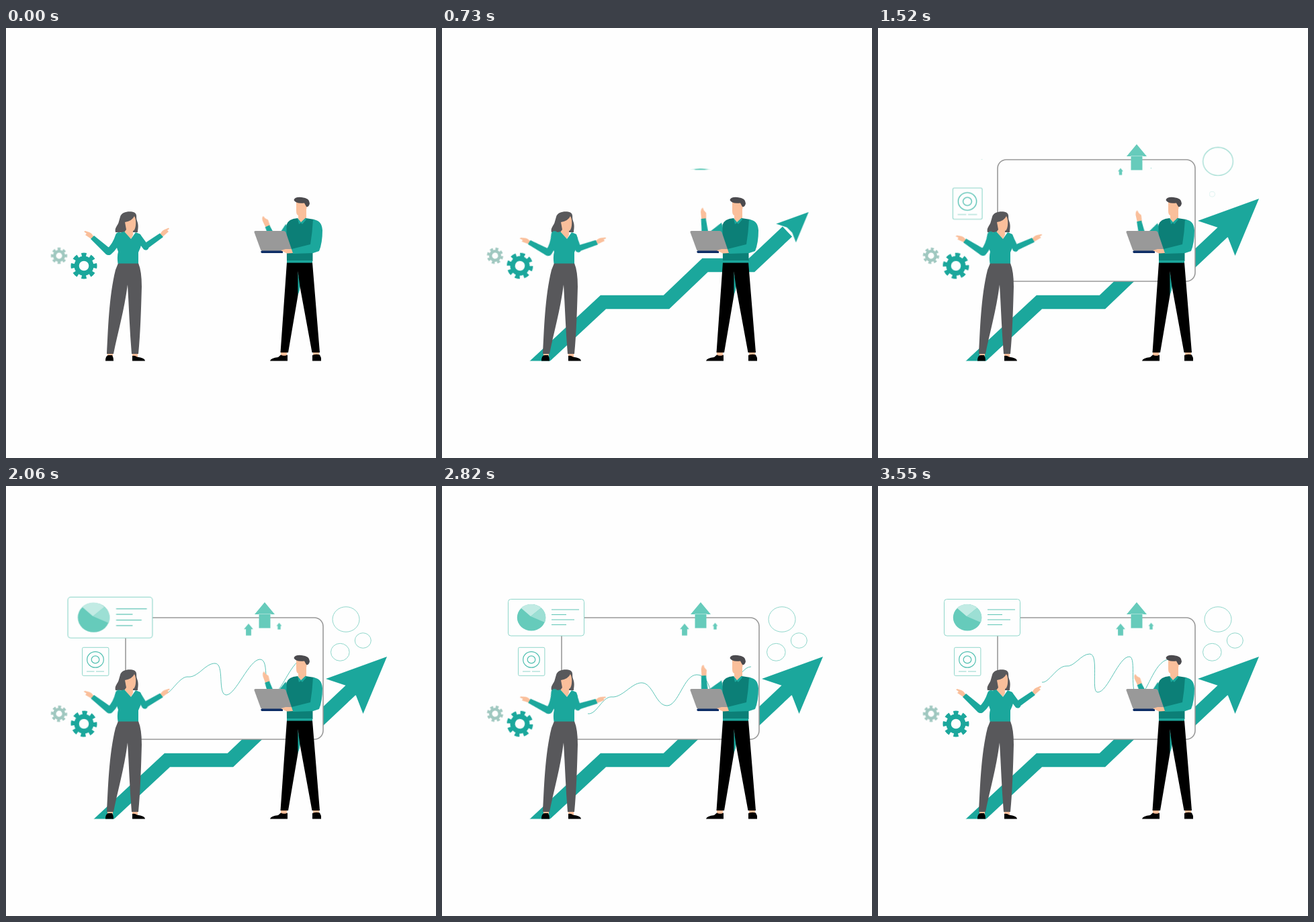
Write an HTML page without scripts that moves like this. It is 640 px wide and 640 px high and loops after 3610 ms.

```html
<!DOCTYPE html>
<html lang="en">
<head>
<meta charset="utf-8">
<title>Growth team</title>
<style>
html, body { margin: 0; width: 100%; height: 100%; overflow: hidden; background: #fefefe; }
svg { display: block; width: 100vw; height: 100vh; }

.teal { fill: #1ba79c; }
.skin { fill: #fabf9b; }
.grey { fill: #58585b; }
.sleeve { fill: none; stroke: #1ba79c; stroke-linejoin: round; stroke-linecap: round; }
.thin { fill: none; stroke: #8fd6ca; stroke-width: 1; }

.sway, .pop, .grow, .body, .wave { animation: 3.61s linear infinite; }
.sway { animation-name: sway; }
.pop { transform-box: fill-box; transform-origin: center; }
.grow { transform-box: fill-box; transform-origin: bottom; animation-name: grow; }
.body { fill: none; stroke: #1ba79c; stroke-width: 20.6; stroke-dasharray: 1 2; animation-name: body; }
.wave { fill: none; stroke: #55c1b4; stroke-width: .95; stroke-dasharray: 1 2; animation-name: draw, wave; }

@keyframes sway {
  0%, 50.5%, 98.3%, to { transform: rotate(0deg); }
  10% { transform: rotate(calc(var(--turn) * .33)); }
  20.2% { transform: rotate(calc(var(--turn) * .75)); }
  29%, 33.5% { transform: rotate(var(--turn)); }
  42.1% { transform: rotate(calc(var(--turn) * .5)); }
  57.1% { transform: rotate(calc(var(--turn) * .22)); }
  74% { transform: rotate(var(--turn)); }
  78.1% { transform: rotate(calc(var(--turn) * .85)); }
}
@keyframes body {
  0% { stroke-dashoffset: 1; }
  14.4%, to { stroke-dashoffset: 0; }
}
@keyframes head {
  0%, 13.3% { transform: scale(0); }
  20.2% { transform: scale(.527); }
  30% { transform: scale(1.32); }
  33.5% { transform: scale(1.145); }
  37%, to { transform: scale(1); }
}
@keyframes grow {
  0%, 19.6% { transform: scaleY(0); }
  20.2% { transform: scaleY(.06); }
  30.2% { transform: scaleY(.78); }
  33.7% { transform: scaleY(1.23); }
  38%, to { transform: scaleY(1); }
}
@keyframes board {
  0%, 30% { transform: scale(0); }
  33.5% { transform: scale(.534); }
  37.5%, to { transform: scale(1); }
}
@keyframes note {
  0%, 30% { transform: scale(0); }
  33.5% { transform: scale(.48); }
  38.5% { transform: scale(1.25); }
  42.1% { transform: scale(1.11); }
  44.5%, to { transform: scale(1); }
}
@keyframes ringA {
  0%, 33.8% { transform: scale(0); }
  39.5% { transform: scale(1.25); }
  42.1% { transform: scale(1.12); }
  44.5%, to { transform: scale(1); }
}
@keyframes ringB {
  0%, 39.5% { transform: scale(0); }
  42.1% { transform: scale(.29); }
  49% { transform: scale(1.25); }
  52%, to { transform: scale(1); }
}
@keyframes ringC {
  0%, 43% { transform: scale(0); }
  51% { transform: scale(1.25); }
  55%, to { transform: scale(1); }
}
@keyframes upA {
  0%, 33% { transform: scale(0); }
  42.1% { transform: scale(.57); }
  47.5% { transform: scale(1.2); }
  50.5%, to { transform: scale(1); }
}
@keyframes upB {
  0%, 41.3% { transform: scale(0); }
  42.1% { transform: scale(.15); }
  50% { transform: scale(1.25); }
  53%, to { transform: scale(1); }
}
@keyframes card {
  0%, 41.6% { transform: scale(0); }
  42.1% { transform: scale(.02); }
  57.1% { transform: scale(1.115); }
  59.5% { transform: scale(1.3); }
  61.2% { transform: scale(1.24); }
  65%, to { transform: scale(1); }
}
@keyframes draw {
  0%, 45.5% { stroke-dashoffset: 1; visibility: hidden; }
  45.6% { visibility: visible; }
  56.5%, to { stroke-dashoffset: 0; visibility: visible; }
}
@keyframes wave {
  0%, 57.1% { d: path("M238 309C246 308 258 284 270 284C286 286 296 264 311 264C326 264 314 311 328 311C342 311 362 258 378 258C394 258 380 310 396 310C408 310 420 272 436 260"); }
  75%, 78.1% { d: path("M217 339C230 341 238 314 252 314C268 316 282 293 297 293C314 293 318 327 335 327C352 327 360 281 379 281C402 281 396 318 412 318C432 318 440 270 460 269"); }
  98.3%, to { d: path("M244 292C254 294 266 268 280 268C292 270 302 250 315 250C330 250 316 307 327 307C342 307 358 254 374 254C386 254 372 312 388 312C400 312 410 262 432 258"); }
}
</style>
</head>
<body>
<svg viewBox="0 0 640 640">
  <defs>
    <g id="gear" fill="none">
      <circle r="10.9" stroke-width="7.2"/>
      <circle r="16.5" stroke-width="6" pathLength="16" stroke-dasharray="1.1 .9" stroke-dashoffset=".55"/>
    </g>
    <path id="up" d="M0-19 15-1H8.5V19.5H-8.5V-1H-15Z" fill="#66cbbb"/>
    <clipPath id="ground"><path d="M0 0H640V495.5H0Z"/></clipPath>
  </defs>

  <!-- growth arrow -->
  <g clip-path="url(#ground)">
    <path class="body" pathLength="1" d="M125 515 240 408H334L391.5 353H461L514 303"/>
  </g>
  <path class="teal pop" style="animation-name:head" d="M567 254 531.5 339 521 312 506 297 476 287Z"/>

  <!-- board and its extras -->
  <rect class="pop" style="animation-name:board" x="178" y="196" width="294" height="181" rx="13" fill="#fefefe" stroke="#999" stroke-width="1.6"/>
  <path class="wave" pathLength="1"/>

  <g class="grow">
    <use href="#up" x="385" y="192"/>
    <path d="M376 190.5H395" stroke="#b5e5dd" stroke-width=".8"/>
  </g>
  <g class="pop" style="animation-name:upA"><use href="#up" transform="translate(361 213.5) scale(.46)"/></g>
  <g class="pop" style="animation-name:upB"><use href="#up" transform="translate(406.5 208.5) scale(.26)"/></g>

  <ellipse class="thin pop" style="animation-name:ringA" cx="506" cy="198.5" rx="20" ry="18.7"/>
  <ellipse class="thin pop" style="animation-name:ringB" cx="497.3" cy="247.3" rx="13.8" ry="13"/>
  <ellipse class="thin pop" style="animation-name:ringC" cx="531.3" cy="230" rx="12" ry="11.3"/>

  <g class="thin pop" style="animation-name:note">
    <rect x="113.5" y="240.3" width="39.4" height="42" rx="2" fill="#fefefe"/>
    <g stroke="#4fbfb0" stroke-width="1.2">
      <ellipse cx="133" cy="258.4" rx="12.3" ry="11.8"/>
      <ellipse cx="133" cy="258.4" rx="5.8" ry="5.5"/>
    </g>
    <path d="M120 276H131.5M134 276H146"/>
  </g>

  <g class="pop" style="animation-name:card">
    <rect class="thin" x="98.5" y="168.5" width="113" height="54.5" rx="4" style="fill:#fefefe"/>
    <ellipse cx="133" cy="195.7" rx="21.2" ry="19.7" fill="#66cbbb"/>
    <path d="M132 194 117.5 181.5A21.2 19.7 0 0 1 147.5 181.5Z" fill="#c2ebe4"/>
    <path d="M132 194 147.5 181.5A21.2 19.7 0 0 1 153 203Z" fill="#9cdfd4"/>
    <path d="M163 184H204M163 191.5H185M163 199H197M163 206.5H185" stroke="#5ec5b5" stroke-width="1.2"/>
  </g>

  <!-- gears -->
  <g transform="translate(79 339) scale(.62)" stroke="#a0c8c0"><use class="sway" style="--turn:20deg" href="#gear"/></g>
  <g transform="translate(116 354)" stroke="#1ba79c"><use class="sway" style="--turn:17deg" href="#gear"/></g>

  <!-- woman -->
  <path class="skin" d="M151 483H159V489H151ZM188 483H196V490H188Z"/>
  <path d="M148 495.5Q148 487 153 487H158Q160 490 160 495.5ZM188 495.5V488Q192 487 195 489.5Q207 491 207 495.5Z"/>
  <path class="grey" d="M167 350H197Q202 362 202 385C201 420 200 455 197 485H187C184 450 183 415 181 382C176 420 166 455 160 485H150C152 450 153 400 163 360Z"/>
  <path class="grey" d="M170 281C172 273 185 272 191 274.5C196 278 193 281 195 287C198 294 196 300 196 304H163C161 297 167 294 168 288Z"/>
  <path class="skin" d="M177 289Q188 287 191 280Q194 285 193 294Q192 301 189 302V308L186 314 176 304 179 300Z"/>
  <g class="sway" style="--turn:-18deg;transform-origin:160px 310px">
    <path class="sleeve" stroke-width="10" d="M168 309Q163 325 153 333"/>
    <path class="skin" d="M131 312Q128 305 124 304L118 302 116 303 120 306 118 308 127 314Z"/>
    <path class="teal" d="M157 330 131 309 126 314 149 337Q155 340 157 334Z"/>
  </g>
  <g class="sway" style="--turn:22deg;transform-origin:194px 310px">
    <path class="sleeve" stroke-width="9" d="M197 311 208 326"/>
    <path class="skin" d="M229 308Q232 301 236 300L242 297.5 243 299 240 301 242 303 234 310Z"/>
    <path class="teal" d="M204 322 229 305.5 234 311 213 326.5Q207 330 204 328Z"/>
  </g>
  <path class="teal" d="M176 303 186 314 193 304 200 307Q204 316 200 327L197 334V350.5H166.5Q165 340 167 333Q161 318 165 306Z"/>

  <!-- man -->
  <g class="sway" style="--turn:25deg;transform-origin:423px 290px">
    <g transform="rotate(-25 423 290)">
      <path class="skin" d="M387 282V275L387 270Q388 264 391 264L392 268 395 272 394 282Z"/>
      <path class="teal" d="M386.5 280H393.5L395 302 416 289 420 308 394 320Q385 320 384.5 310Z"/>
    </g>
  </g>
  <path class="skin" d="M409 481H418V488H409ZM457 481H466V488H457Z"/>
  <path d="M393 495.5Q394 491 405 490L409 486.5Q414 489 419 486.5V495.5ZM456 495.5V487Q462 485 467 486.5L469 491V495.5Z"/>
  <path class="teal" d="M434 362 438 380Q438 390 434 398Z"/>
  <path d="M418 349H456L467 483H455.5L437.5 385Q436 375 434.5 362V398L420 483H408.5Z"/>
  <path class="skin" d="M432 259H446Q449 264 447 270V284L439 290 435 284V279Q432 278 432 272Z"/>
  <path d="M428.5 256Q430 251 440 252Q452 253 452 261Q451 267 447 266L444 260.5Q431 262 428.5 256Z" fill="#4b4a4e"/>
  <path d="M417.5 293Q420 284 434 283L439 290 446 283 459 285Q463 305 456.5 328V347H418Z" fill="#0c7f77"/>
  <path class="teal" d="M434 283 439 289 446 282.5 447 285 441 292 439 290 436 292ZM418 346H456V349.5H418Z"/>
  <path class="teal" d="M457 285Q470 286 471 301Q471 320 466 332L457 335 427 336 425 329 453 322Q456 304 457 285Z"/>
  <path d="M371.5 302H413Q415.5 302 416.5 304L425 329Q425 332 422 332H382Q380 332 379 330L369.5 304Q369 302 371.5 302Z" fill="#999"/>
  <path d="M380.5 331.5H412V335H380.5Q378 333 380.5 331.5Z" fill="#0d2d66"/>
  <path class="skin" d="M409 331 416 329 425 329 427 335 418 335.5Z"/>
</svg>
</body>
</html>
```
